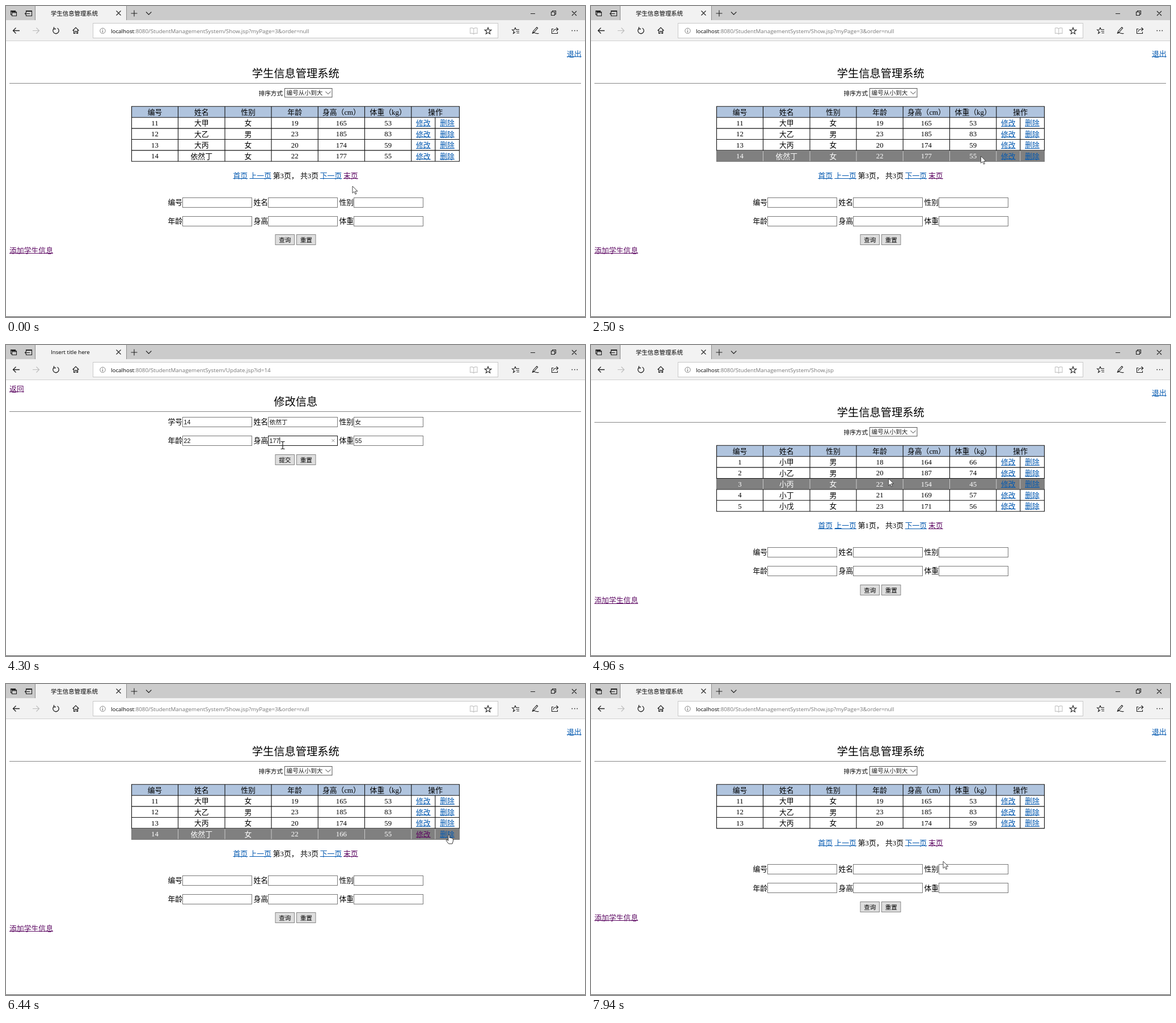
Animation of 1021x549 px, one loop 8 s. Source, as an HTML page:

```html
<!DOCTYPE html>
<html lang="zh-CN">
<head>
<meta charset="utf-8">
<title>学生信息管理系统</title>
<style>
html, body { margin: 0; width: 100%; height: 100%; overflow: hidden; background: #fff; }
svg { display: block; width: 100%; height: 100%; }
text { white-space: pre; font-family: "Liberation Serif", "Noto Sans CJK SC", "Noto Sans CJK", serif; }
.ui { font-family: "Open Sans", "Noto Sans CJK SC", "Noto Sans CJK", sans-serif; }
.field { font-family: "Liberation Sans", "Noto Sans CJK SC", "Noto Sans CJK", sans-serif; }
.icon { fill: none; stroke: #222; stroke-width: 1.1; }
</style>
</head>
<body>
<svg viewBox="0 0 1021 549">
  <rect width="1021" height="549" fill="#fff"/>
  <g id="page"></g>
  <rect width="1021" height="25" fill="#cbcbcb"/>
  <rect y="25" width="1021" height="36" fill="#f2f2f2"/>
  <rect x="52" width="160" height="26" fill="#f2f2f2"/>
  <path d="M0 61.5H1021" stroke="#cfcfcf"/>
  <path d="M51.5 0V25M212.5 0V25" stroke="#8f8f8f"/>
  <path d="M0 548.5H1021" stroke="#555"/>
  <rect x="153.5" y="30.5" width="714" height="26" fill="#fff" stroke="#c8c8c8"/>
  <g class="icon">
    <path d="M10.5 15.5H8.5V8.500H16.5V10.5M8.5 9.5H16.5M10.5 10.5H18.5V17.5H10.5ZM10.5 11.8H18.5"/>
    <path d="M35.5 11V8.500H45.5V17.5H35.5V15.5M35.5 9.5H45.5M42 13.5H33.5M36 11L33.5 13.5L36 16"/>
    <path d="M194.5 8.5L202.5 16.5M202.5 8.5L194.5 16.5M226 7.5V18.5M220.5 13H231.5M247 10.5L251.7 15.2L256.4 10.5"/>
    <path d="M925 13.5H933M961.5 10.5H967.5V16.5H961.5ZM963.5 10.5V8.5H969.5V14.5H967.5M998 9L1006 17M1006 9L998 17"/>
    <path d="M24 43.5H12.5M17.5 38.5L12.5 43.5L17.5 48.5" stroke-width="1.3"/>
    <path d="M47 43.5H58.5M53.5 38.5L58.5 43.5L53.5 48.5" stroke="#bbb"/>
    <path d="M85 39.3A5.2 5.2 0 1 0 90.5 39M84.5 37V40.5H88" stroke-width="1.3"/>
    <path d="M117.5 43.5L123 38L128.5 43.5M119.5 42V48.5H121.8V44.5H124.7V48.5H126.5V42" stroke-width="1.2"/>
    <path d="M170.5 43V47M170.5 40.8V42" stroke="#777"/><circle cx="170.5" cy="43.8" r="4.7" stroke="#777" stroke-width=".9"/>
    <path d="M824.7 40V49.5M824.7 40Q822 38 818.5 39V48.5Q822 47.5 824.7 49.5Q827.5 47.5 831 48.5V39Q827.5 38 824.7 40" stroke="#c4c4c4"/>
    <path id="star"/>
    <path d="M898 38L899.3 41.5H905M898 38L896.5 41.8L892.5 42L895.7 44.7L894.6 48.5L898 46.3M899.5 44.5H905M900.5 47.5H905"/>
    <path d="M928 48.5L930 44L936 37.5L937.7 39L931.5 46L928 48.5Q932 46.5 933 47.7T939.5 48.5"/>
    <path d="M965.5 40.5H962.5V48.5H972.5V45.5M965 45.5Q966 41 970 41H973.5M970.5 38L973.7 41L970.5 44"/>
  </g>
  <path d="M997.5 43.5h1.6m2.9 0h1.6m2.9 0h1.6" stroke="#222" stroke-width="1.6"/>
  <g id="tab"></g>
  <g id="cursor"></g>
</svg>
<script>
const $ = id => document.getElementById(id);
const EM = 12.83, SMALL = 10.67, ROW = 19.4;
const BLUE = '#0459b0', VISITED = '#5c0862';
const COLS = [221.5, 303.5, 386, 468, 550.3, 632.5, 714.8, 756.8, 799.5];
const HEAD = ['编号', '姓名', '性别', '年龄', '身高（cm）', '体重（kg）'];
const NAME = '依然丁';
const FIRST = [
  [1, '小甲', '男', 18, 164, 66], [2, '小乙', '男', 20, 187, 74], [3, '小丙', '女', 22, 154, 45],
  [4, '小丁', '男', 21, 169, 57], [5, '小戊', '女', 23, 171, 56]];
const LAST = [[11, '大甲', '女', 19, 165, 53], [12, '大乙', '男', 23, 185, 83], [13, '大丙', '女', 20, 174, 59]];

const star = [...Array(10)].map((_, i) => {
  const a = i * Math.PI / 5, r = i % 2 ? 2.6 : 6.2;
  return [850 + r * Math.sin(a), 44.2 - r * Math.cos(a)].map(v => v.toFixed(1));
});
$('star').setAttribute('d', 'M' + star.join('L') + 'Z');

// y is the visual middle of the glyphs
function text(x, y, s, { size = EM, fill = '#000', anchor = 'start', cls = '' } = {}) {
  return `<text class="${cls}" x="${x}" y="${y + size * .36}" font-size="${size}" fill="${fill}" text-anchor="${anchor}">${s}</text>`;
}
const mid = (x, y, s, o) => text(x, y, s, { anchor: 'middle', ...o });
const rect = (x, y, w, h, fill, stroke = 'none') =>
  `<rect x="${x}" y="${y}" width="${w}" height="${h}" fill="${fill}" stroke="${stroke}"/>`;
const line = (d, stroke, width = 1) => `<path d="${d}" fill="none" stroke="${stroke}" stroke-width="${width}"/>`;
const snap = y => Math.floor(y) + .5;
const link = (x, y, s, fill = BLUE) =>
  text(x, y, s, { fill }) + rect(x, Math.round(y + 5), s.length * EM, 1, fill);

function heading(y, s) {
  return mid(510.7, y, s, { size: 19.25 }) + line(`M6 ${snap(y + 17.3)}H1014`, '#858585', 1.1);
}

function form(y, idLabel, submit, values = [], focused = -1) {
  const labels = [idLabel, '姓名', '性别', '年龄', '身高', '体重'];
  let out = '';
  labels.forEach((label, i) => {
    const x = 311.5 + 151 * (i % 3), cy = y + (i > 2 ? 33.1 : 0), top = snap(cy - 8);
    out += text(x - 26, cy, label) + rect(x, top, 122, 17, '#fff', i === focused ? '#111' : '#777');
    if (values[i] !== undefined)
      out += text(x + 2, cy + .3, values[i], { size: SMALL, cls: 'field', fill: '#111' });
    if (i === focused) {
      const end = x + 2.5 + String(values[i]).length * 5.93;
      out += line(`M${end} ${cy - 6}V${cy + 6}`, '#000') +
        line(`M${x + 112} ${cy - 2.5}l5 5m0 -5l-5 5`, '#777', .8);
    }
  });
  const by = snap(y + 57.5);
  [[475, submit], [512.5, '重置']].forEach(([x, s]) => {
    out += rect(x, by, 33.5, 18, '#dedede', '#858585') + mid(x + 16.8, by + 9.3, s, { size: SMALL });
  });
  return out;
}

function table(rows, cur, editedId) {
  const top = 177.3, bottom = top + ROW * (rows.length + 1);
  const inside = cur.x > COLS[0] && cur.x < COLS[8];
  const hover = inside ? Math.floor((cur.y - top) / ROW) - 1 : -1;
  const header = rect(COLS[0], top, 578, ROW, '#b0c4de');
  let grid = '', words = '', marks = '';
  HEAD.forEach((s, c) => words += mid((COLS[c] + COLS[c + 1]) / 2, top + 10.3, s));
  words += mid(757.2, top + 10.3, '操作');
  for (let r = 0; r <= rows.length + 1; r++) grid += `M221 ${top + r * ROW}H800`;
  COLS.forEach((x, c) => grid += `M${x} ${top + (c === 7 ? ROW : 0)}V${bottom}`);
  rows.forEach((row, r) => {
    const y = top + ROW * (r + 1), cy = y + 10, on = r === hover;
    if (on) marks = rect(221, y + .5, 579, ROW - (r === rows.length - 1 ? 0 : 1), '#808080') +
      COLS.slice(1, 8).map(x => line(`M${x} ${y + 1}v${ROW - 1.5}`, '#c9c9c9')).join('');
    row.forEach((v, c) => words += mid((COLS[c] + COLS[c + 1]) / 2, cy - (c === 1 || c === 2 ? 0 : .4), v, { fill: on ? '#fff' : '#000' }));
    words += link(723, cy, '修改', row[0] === editedId ? VISITED : BLUE) + link(765.2, cy, '删除');
  });
  return header + line(grid, '#111', 1.1) + marks + words;
}

function listPage(rows, pageNo, cur, editedId) {
  const y = 299.3 + (rows.length - 4) * ROW;
  return link(989, 84.4, '退出') + heading(119.4, '学生信息管理系统') +
    text(445.5, 154, '排序方式', { size: SMALL }) +
    rect(491.5, 145.5, 83.5, 15.5, '#fff', '#555') +
    text(494.5, 153.3, '编号从小到大', { size: SMALL, fill: '#222' }) +
    line('M563.5 151l4.5 4.5l4.5 -4.5', '#333') +
    table(rows, cur, editedId) +
    link(400.4, y, '首页') + link(429.4, y, '上一页') +
    text(470.8, y, `第${pageNo}页， 共3页`) +
    link(553.7, y, '下一页') + link(595, y, '末页', VISITED) +
    form(y + 46.9, '编号', '查询') + link(6, y + 132, '添加学生信息', VISITED);
}

function editPage(height, focused) {
  return link(6, 77.3, '返回', VISITED) + heading(100.2, '修改信息') +
    form(135.6, '学号', '提交', [14, NAME, '女', 22, height, 55], focused ? 4 : -1);
}

const CURSORS = {
  arrow: '<path d="M0 0V12.3L2.9 9.7L5 14.3L6.9 13.4L4.9 9H9Z" fill="#fff" stroke="#333" stroke-width=".9"/>',
  hand: '<path d="M-1.2 8.5V1Q0 -1 1.2 1V5.5Q2.5 4.6 3.4 6Q4.7 5.2 5.5 6.7Q7.3 6 7.5 8V11L6 16H-.5L-4.8 10.5Q-4.9 8.5 -3 9L-1.2 10.5Z" fill="#fff" stroke="#222" stroke-width=".9"/>',
  beam: '<path d="M-3.5 -6.5H-1L0 -5.5L1 -6.5H3.5M0 -5.5V5.5M-3.5 6.5H-1L0 5.5L1 6.5H3.5" fill="none" stroke="#222" stroke-width="1.2"/>'
};
// time, x, y, pointer shape from then on
const PATH = [
  [0, 611, 318, 'arrow'], [1500, 646, 267, 'arrow'], [3500, 729, 263, 'hand'], [4000, 729, 263, 'hand'],
  [4060, 720, 259, 'arrow'], [4240, 488, 177, 'beam'], [4600, 488, 177, 'beam'], [4720, 491, 203, 'arrow'],
  [4840, 491, 203, 'arrow'], [5260, 609, 318, 'hand'], [5380, 609, 318, 'arrow'], [5500, 611, 318, 'arrow'],
  [5740, 650, 272, 'arrow'], [5940, 690, 267, 'arrow'], [6440, 781, 266, 'hand'], [7040, 781, 266, 'hand'],
  [7240, 765, 281, 'arrow'], [7640, 609, 318, 'hand'], [7760, 609, 318, 'arrow'], [7940, 621, 313, 'arrow']];

function pointer(t) {
  let i = PATH.length - 1;
  while (PATH[i][0] > t) i--;
  const [t0, x0, y0, kind] = PATH[i], [t1, x1, y1] = PATH[i + 1] || [t0 + 1, x0, y0];
  const k = (t - t0) / (t1 - t0);
  return { x: x0 + (x1 - x0) * k, y: y0 + (y1 - y0) * k, kind };
}

function hold(t) {
  const step = (start, size) => start + Math.floor((t - start) / size) * size;
  if (t < 4000) return step(0, 500);
  if (t < 5740) return step(4000, 60);
  if (t < 5940) return 5740;
  if (t < 6440) return 5940;
  return t < 7640 ? step(6440, 200) : Math.min(7940, step(7640, 60));
}

function typed(t) {
  return ['177', '17', '1', '16', '166'][Math.max(0, Math.min(4, Math.floor((t - 4300) / 60)))];
}

function draw(t) {
  const cur = pointer(t);
  const editing = t >= 4060 && t < 4840;
  const first = t >= 4840 && t < 5380 || t >= 7240 && t < 7760;
  const edited = t >= 4840;
  const rows = first ? FIRST : t >= 7760 ? LAST : [...LAST, [14, NAME, '女', 22, edited ? 166 : 177, 55]];
  $('page').innerHTML = editing ? editPage(typed(t), t >= 4240) : listPage(rows, first ? 1 : 3, cur, edited ? 14 : 0);
  const path = editing ? 'Update.jsp?id=14' : first ? 'Show.jsp' : 'Show.jsp?myPage=3&amp;order=null';
  const title = editing ? 'Insert title here' : '学生信息管理系统';
  $('tab').innerHTML =
    text(79, 12.8, title, { size: editing ? 9.68 : 10.4, cls: 'ui' }) +
    text(185, 44, `localhost<tspan fill="#777">:8080/StudentManagementSystem/${path}</tspan>`, { size: 9.8, cls: 'ui' });
  $('cursor').setAttribute('transform', `translate(${cur.x} ${cur.y})`);
  $('cursor').innerHTML = CURSORS[cur.kind];
}

const start = performance.now();
let shown = -1;
function tick() {
  const t = hold((performance.now() - start) % 8000);
  if (t !== shown) draw(shown = t);
  requestAnimationFrame(tick);
}
tick();
</script>
</body>
</html>
```
